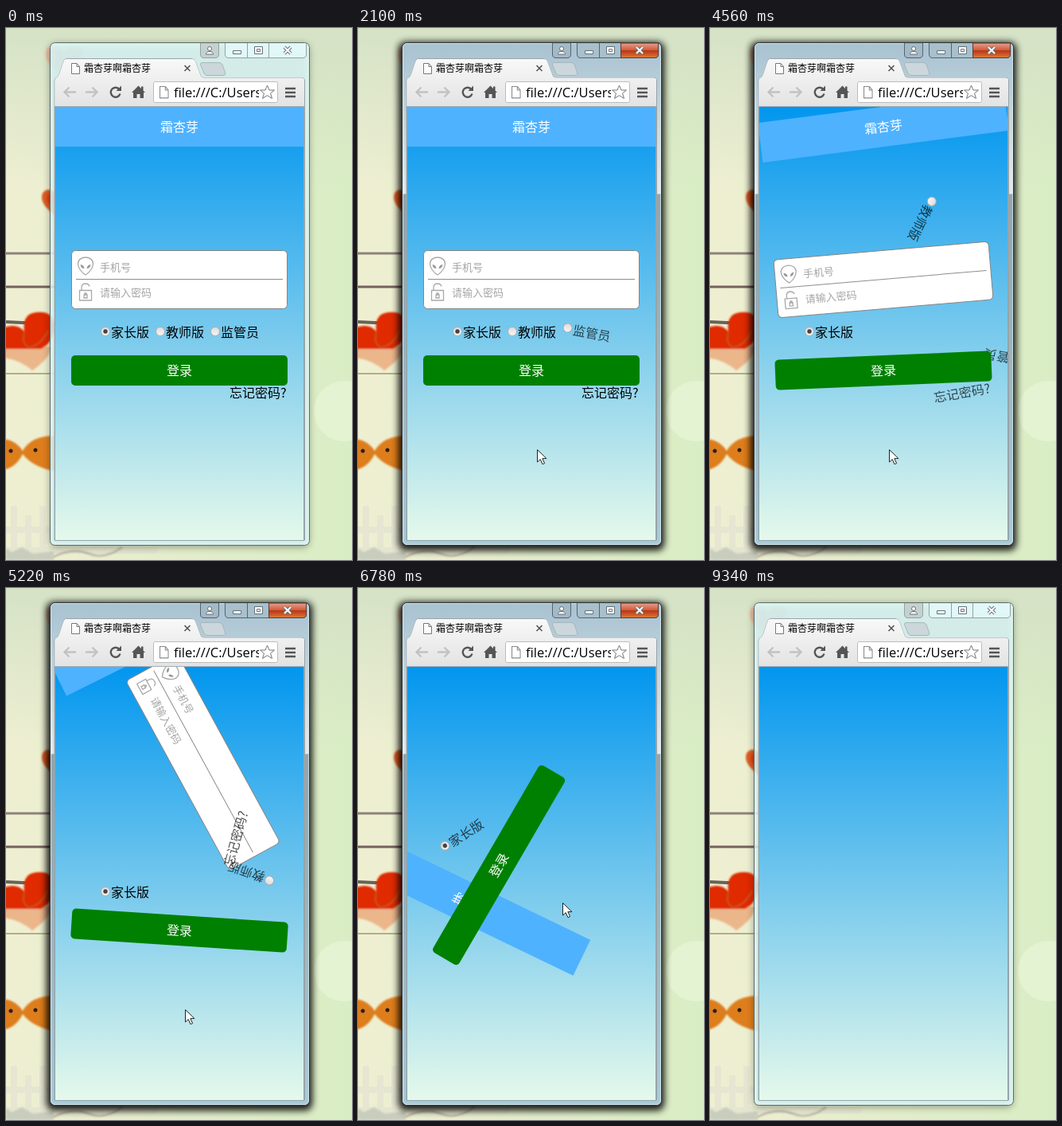
An HTML page that plays this animation: 435x668 px, repeating every 9.46 s.

```html
<!DOCTYPE html>
<html lang="zh-CN">
<head>
<meta charset="utf-8">
<title>霜杏芽啊霜杏芽</title>
<style>
html, body { margin: 0; width: 100%; height: 100%; overflow: hidden; background: #e2edcb; }
svg { display: block; width: 435px; height: 668px; }
text { font: 300 16px "Noto Sans CJK SC", "Noto Sans CJK", sans-serif; }
.mid { text-anchor: middle; fill: #fff; }
.hint { font-size: 13px; fill: #a5a5a5; }
.tab { font-size: 12px; font-weight: 400; }
.url { font: 16.5px "Open Sans", "Noto Sans", sans-serif; }
.line { fill: none; stroke: #a9a9a9; stroke-width: 1.3; }
.ink { fill: none; stroke: #555; stroke-width: 2.4; }
.pale { fill: none; stroke: #c2c2c2; stroke-width: 2.4; }
.tilted .name { opacity: .68; }
</style>
</head>
<body>
<svg viewBox="0 0 435 668">
  <defs>
    <linearGradient id="wall" x1="0" y1="0" x2="1" y2="0">
      <stop offset="0" stop-color="#efefd2"/><stop offset=".5" stop-color="#e3edcb"/><stop offset="1" stop-color="#d9edc4"/>
    </linearGradient>
    <linearGradient id="wallTop" x1="0" y1="0" x2="0" y2="1">
      <stop offset="0" stop-color="#d5e2c6"/><stop offset=".3" stop-color="#d5e2c6" stop-opacity="0"/>
    </linearGradient>
    <linearGradient id="sky" x1="0" y1="0" x2="0" y2="1">
      <stop offset="0" stop-color="#0296ef"/><stop offset="1" stop-color="#e5f9eb"/>
    </linearGradient>
    <linearGradient id="bar" x1="0" y1="0" x2="0" y2="1">
      <stop offset="0" stop-color="#f8f8f8"/><stop offset="1" stop-color="#e3e3e3"/>
    </linearGradient>
    <linearGradient id="glass" x1="0" y1="0" x2="0" y2="1">
      <stop offset="0" stop-color="#a9c2d0"/><stop offset=".12" stop-color="#bdd3de"/>
      <stop offset=".3" stop-color="#e0ebef"/><stop offset=".302" stop-color="#8fa6b0"/>
      <stop offset=".7" stop-color="#9db9c4"/><stop offset="1" stop-color="#a9cbd9"/>
    </linearGradient>
    <linearGradient id="red" x1="0" y1="0" x2="0" y2="1">
      <stop offset="0" stop-color="#e5a08c"/><stop offset=".48" stop-color="#cf5a3c"/>
      <stop offset=".52" stop-color="#b93712"/><stop offset="1" stop-color="#dd7b3d"/>
    </linearGradient>
    <linearGradient id="knob" x1="0" y1="0" x2="0" y2="1">
      <stop offset="0" stop-color="#dcdcdc"/><stop offset="1" stop-color="#f6f6f6"/>
    </linearGradient>
    <filter id="blur" x="-20%" y="-20%" width="140%" height="140%"><feGaussianBlur stdDeviation="5"/></filter>
    <filter id="soft"><feGaussianBlur stdDeviation=".8"/></filter>
    <clipPath id="view"><path d="M62 99H374V643H62Z"/></clipPath>
    <clipPath id="field"><path d="M186 68H318V94H186Z"/></clipPath>
    <path id="heart" d="M0 28C-14 14-30 4-29-12C-28-27-8-28 0-12C8-28 28-27 29-12C30 4 14 14 0 28Z"/>
    <g id="doc"><path d="M.5.5H7L10.500 4.500V13.500H.5Z" fill="#fff"/><path d="M7 .5V4.500H10.500" fill="none"/></g>
    <circle id="dial" cx="-24" cy="-1" r="5.500" fill="url(#knob)" stroke="#adadad"/>
  </defs>

  <!-- desktop -->
  <path d="M0 0H435V668H0Z" fill="url(#wall)"/>
  <path d="M0 0H435V668H0Z" fill="url(#wallTop)"/>
  <circle cx="425" cy="481" r="38" fill="#e4f3d1"/>
  <g fill="none" stroke-width="3">
    <path d="M0 283H62" stroke="#8d837a"/><path d="M0 325H62" stroke="#75635f"/>
    <path d="M0 369L62 372" stroke="#6b6258" stroke-width="4"/><path d="M0 434H62" stroke="#b5ac8c" stroke-width="2"/>
  </g>
  <path d="M10 600V668M28 612V668M46 600V668M0 630H56M0 656H190" stroke="#dfdfd3" stroke-width="8" opacity=".5"/>
  <g filter="url(#soft)">
    <use href="#heart" transform="translate(73 41) scale(.8)" fill="#e9bda0"/>
    <use href="#heart" transform="translate(66 220) scale(.72)" fill="#dd5a20"/>
    <use href="#heart" transform="translate(66 219) scale(.5)" fill="#e23a10"/>
    <path d="M-2 400H58Q54 416 33 430Q20 418-2 414Z" fill="#ebb689"/>
    <path d="M-2 376Q14 370 23 381Q20 359 38 357Q62 354 61 378Q58 396 44 403H-2Z" fill="#e02c06"/>
    <path d="M23 381Q19 398 30 401Q44 398 53 380" fill="none" stroke="#c8511f" stroke-width="2"/>
    <path d="M-5 516Q12 517 21 531Q32 511 64 512V557Q34 552 21 535Q12 553-5 555Z" fill="#de7d1d"/>
    <path d="M0 654L8 658L20 652L34 660L60 657V668H0Z" fill="#c9cdbd"/>
    <path d="M60 664Q84 652 104 660T146 652" fill="none" stroke="#b3ac9a" stroke-width="2"/>
  </g>
  <g fill="#222"><circle cx="6" cy="531" r="2.500"/><circle cx="37" cy="530" r="2.500"/></g>

  <!-- window frame -->
  <rect x="55" y="20" width="326" height="632" rx="7" filter="url(#blur)" opacity=".35"/>
  <rect x="55.500" y="18.500" width="326" height="631" rx="6" fill="#e2ffff" fill-opacity=".82" stroke="#5f6b69"/>
  <g fill="#dcebea" stroke="#93a3a3">
    <path d="M244.500 19V33Q244.500 37.500 249 37.500H263Q267.500 37.500 267.500 33V19" fill="#c5d0d0"/>
    <path d="M275.500 19V33Q275.500 37.500 280 37.500H373Q377.500 37.500 377.500 33V19" fill="#e2f8f8"/>
    <path d="M303.500 19V37M330.500 19V37"/>
  </g>
  <g id="active">
    <rect x="51" y="18" width="334" height="638" rx="8" filter="url(#blur)" opacity=".85"/>
    <rect x="55.500" y="18.500" width="326" height="631" rx="6" fill="url(#glass)" stroke="#2d373c"/>
    <rect x="56.500" y="19.500" width="324" height="629" rx="5" fill="none" stroke="#e4f1f6" stroke-opacity=".7"/>
    <g stroke="#53656f">
      <path d="M244.500 19V33Q244.500 37.500 249 37.500H263Q267.500 37.500 267.500 33V19" fill="#a3b9c6"/>
      <path d="M275.500 19V33Q275.500 37.500 280 37.500H373Q377.500 37.500 377.500 33V19" fill="#a9bfcc"/>
      <path d="M303.500 19V37M330.500 19V37"/>
      <path d="M330.500 19V37.500H373Q377.500 37.500 377.500 33V19Z" fill="url(#red)" stroke="#63382f"/>
    </g>
  </g>
  <g fill="#fff" stroke="#66727a">
    <circle cx="256" cy="26" r="2.500"/><path d="M251.500 33Q251.500 29.500 256 29.500Q260.500 29.500 260.500 33Z"/>
    <path d="M285.500 28.500H295.500V32.500H285.500Z"/>
    <path d="M312.500 23.500H322.500V32.500H312.500ZM315.500 26.500H319.500V29.500H315.500Z"/>
    <path d="M350 24L358 32M358 24L350 32" stroke-width="4"/><path d="M350 24L358 32M358 24L350 32" stroke="#fff" stroke-width="2"/>
  </g>
  <path d="M246 43.500H268Q271 43.500 272 46L276 57Q276 59.500 273 59.500H253Q250 59.500 249 57L244.500 46Q244 43.500 246 43.500Z" fill="#cbd7db" stroke="#aab6ba"/>
  <path d="M61 643V66Q61 62.500 64 62.500Q66 61 67 58L72 43Q73 38.500 77 38.500H233Q237 38.500 238 42L244 58Q245 62.500 249 62.500H371Q375.500 62.500 375.500 66V643Z" fill="url(#bar)" stroke="#98a4a8"/>
  <path d="M61.500 98V66Q61.500 62.500 64 62.500Q66 61 67 58L72 43Q73 39 77 39H233Q237 39 238 42L244 58Q245 62.500 249 62.500H371Q375 62.500 375 66V98Z" fill="url(#bar)"/>
  <use href="#doc" x="82" y="44" stroke="#777"/>
  <text class="tab" x="98" y="55">霜杏芽啊霜杏芽</text>
  <path d="M224.500 47L231.500 54M231.500 47L224.500 54" stroke="#555" stroke-width="1.600"/>
  <g class="pale"><path d="M88 80.500H74M79.500 74.500L73.500 80.500L79.500 86.500"/><path d="M100 80.500H114M108.500 74.500L114.500 80.500L108.500 86.500"/></g>
  <path class="ink" d="M142.500 77A6 6 0 1 0 143.500 82.500"/><path d="M138.500 79H145V72.500Z" fill="#555"/>
  <path d="M158 81L166.500 72.500L170 76V73.500H172.500V78.500L175 81H173V88H168.500V83H164.500V88H160V81Z" fill="#555"/>
  <rect x="185.500" y="67.500" width="156" height="26" rx="2" fill="#fff" stroke="#bcbcbc"/>
  <use href="#doc" transform="translate(193 73) scale(1.05 1.1)" stroke="#8b8b8b"/>
  <g clip-path="url(#field)"><text class="url" x="211" y="87">file:///C:/Users</text></g>
  <path d="M328.500 72L331 78H337.500L332.500 82L334.500 88.500L328.500 84.700L322.500 88.500L324.500 82L319.500 78H326Z" fill="#fff" stroke="#777"/>
  <path d="M351 76H364M351 81H364M351 86H364" stroke="#555" stroke-width="2.600"/>
  <path d="M61 98.500H375" stroke="#a6aeb2"/>

  <!-- page -->
  <g clip-path="url(#view)">
    <path d="M62 99H374V643H62Z" fill="url(#sky)"/>
    <g id="head"><path d="M-156-25H156V25H-156Z" fill="#4fb2ff"/><text class="mid" y="6">霜杏芽</text></g>
    <g id="form">
      <rect x="-135.500" y="-36.500" width="271" height="73" rx="5" fill="#fff" stroke="#858585"/>
      <path d="M-130-.5H130" stroke="#8d8d8d"/>
      <g transform="translate(-118 -17)">
        <path class="line" d="M0 11C-5 8-9.500 2-9.500-3C-9.500-8-5-11 0-11S9.500-8 9.500-3C9.500 2 5 8 0 11Z"/>
        <path d="M-6.500-2Q-2-1.500-1.500 3Q-6 3-6.500-2ZM6.500-2Q2-1.500 1.500 3Q6 3 6.500-2Z" fill="#999"/>
      </g>
      <g transform="translate(-118 16)" class="line">
        <path d="M-7.500-2.500H7.500V10H-7.500ZM-5-3V-6Q-5-11 0-11Q4-11 5-7.500"/><path d="M-2 3H2V7H-2ZM-1 3V1H1V3"/>
      </g>
      <text class="hint" x="-100" y="-11">手机号</text><text class="hint" x="-100" y="21">请输入密码</text>
    </g>
    <g id="parent"><use href="#dial"/><circle cx="-24" cy="-1" r="2.700" fill="#444"/><text class="name" x="-17" y="6">家长版</text></g>
    <g id="teacher"><use href="#dial"/><text class="name" x="-17" y="6">教师版</text></g>
    <g id="guard"><use href="#dial"/><text class="name" x="-17" y="6">监管员</text></g>
    <g id="login"><rect id="face" x="-136" y="-19" width="272" height="38" rx="5" fill="#008000"/><text class="mid" y="6">登录</text></g>
    <g id="forgot"><text class="name" x="-37" y="6">忘记密码?</text></g>
  </g>
  <path d="M61.500 99V643.500H374.500V99" fill="none" stroke="#93a5ab"/>
  <path id="cursor" d="M.5.5V16L4.200 12.600L7 18.700L9.600 17.500L6.800 11.600H12Z" fill="#fff" stroke="#222"/>
</svg>
<script>
const LOOP = 9.46, G = 506, SPIN = 2;
const $ = id => document.getElementById(id);

// swing: [time, angle] turning points; the last one is the moment of launch
const parts = [
  { id: "head", x: 218, y: 124, vx: -41, up: 331, swing: [[3.34, 0], [3.7, 2.2], [4.05, -5], [4.3, 4], [4.56, -7.4], [4.9, 0]] },
  { id: "form", x: 218, y: 316, vx: 63, up: 327, end: 6.15, swing: [[2.5, 0], [2.8, 4], [3.1, -6.5], [3.3, 7], [3.59, -7], [4.05, 7], [4.5, -6], [4.75, 2]] },
  { id: "parent", x: 149, y: 382, vx: -97, up: 410, swing: [[5.3, 0], [5.6, -3], [5.95, 6], [6.25, -8], [6.585, 5]] },
  { id: "teacher", x: 218, y: 382, vx: 63, up: 381, swing: [[2.2, 0], [2.5, -4], [2.95, 6], [3.3, -10], [3.78, 18]] },
  { id: "guard", x: 287, y: 382, vx: 64, up: 326, swing: [[1.39, 0], [1.7, -7], [2.12, 11], [2.6, -11], [3.18, 13]] },
  { id: "login", x: 218, y: 430, vx: -77, up: 289, swing: [[4.3, 0], [4.62, -2.6], [5.1, 7], [5.52, -10], [6.15, 22], [6.25, 22]] },
  { id: "forgot", x: 318, y: 458, vx: -55, up: 409, swing: [[2.85, 0], [3.2, -2], [3.6, 4], [3.95, -7], [4.3, 9], [4.7, -17]] }
];

const path = [[.05, 214, 668], [.56, 228, 436], [.81, 228, 436], [1.13, 225, 529], [6.3, 225, 529], [6.7, 257, 395],
  [8.14, 257, 395], [8.36, 165, 217], [8.48, 141, 140], [8.6, 200, 62], [8.74, 403, 300], [8.9, 403, 602]];

// eased value of column k at time t
function at(rows, t, k) {
  const i = rows.findIndex(r => r[0] > t);
  if (i === 0) return rows[0][k];
  if (i < 0) return rows[rows.length - 1][k];
  const a = rows[i - 1], b = rows[i];
  const u = (t - a[0]) / (b[0] - a[0]);
  return a[k] + (b[k] - a[k]) * (1 - Math.cos(Math.PI * u)) / 2;
}

function draw(t) {
  for (const p of parts) {
    const launch = p.swing[p.swing.length - 1][0];
    const f = Math.max(0, t - launch);
    const dx = p.vx * f, dy = f * (G * f / 2 - p.up);
    const turn = at(p.swing, t, 1) + SPIN * dx;
    const el = $(p.id);
    el.setAttribute("transform", `translate(${p.x + dx} ${p.y + dy}) rotate(${turn})`);
    el.classList.toggle("tilted", t > p.swing[0][0]);
    el.style.visibility = t < (p.end || 8.95) ? "visible" : "hidden";
  }
  $("active").style.opacity = t < .05 || t >= 9.34 ? 0 : Math.min(1, .3 + (t - .05) / .3);
  $("face").setAttribute("fill", t >= .81 && t < .95 ? "#007600" : "#008000");
  const c = $("cursor");
  c.style.visibility = t >= .05 && t < 8.91 ? "visible" : "hidden";
  c.setAttribute("transform", `translate(${at(path, t, 1)} ${at(path, t, 2)})`);
}

const start = performance.now();
function tick() {
  draw((performance.now() - start) / 1000 % LOOP);
  requestAnimationFrame(tick);
}
draw(0);
requestAnimationFrame(tick);
</script>
</body>
</html>
```
